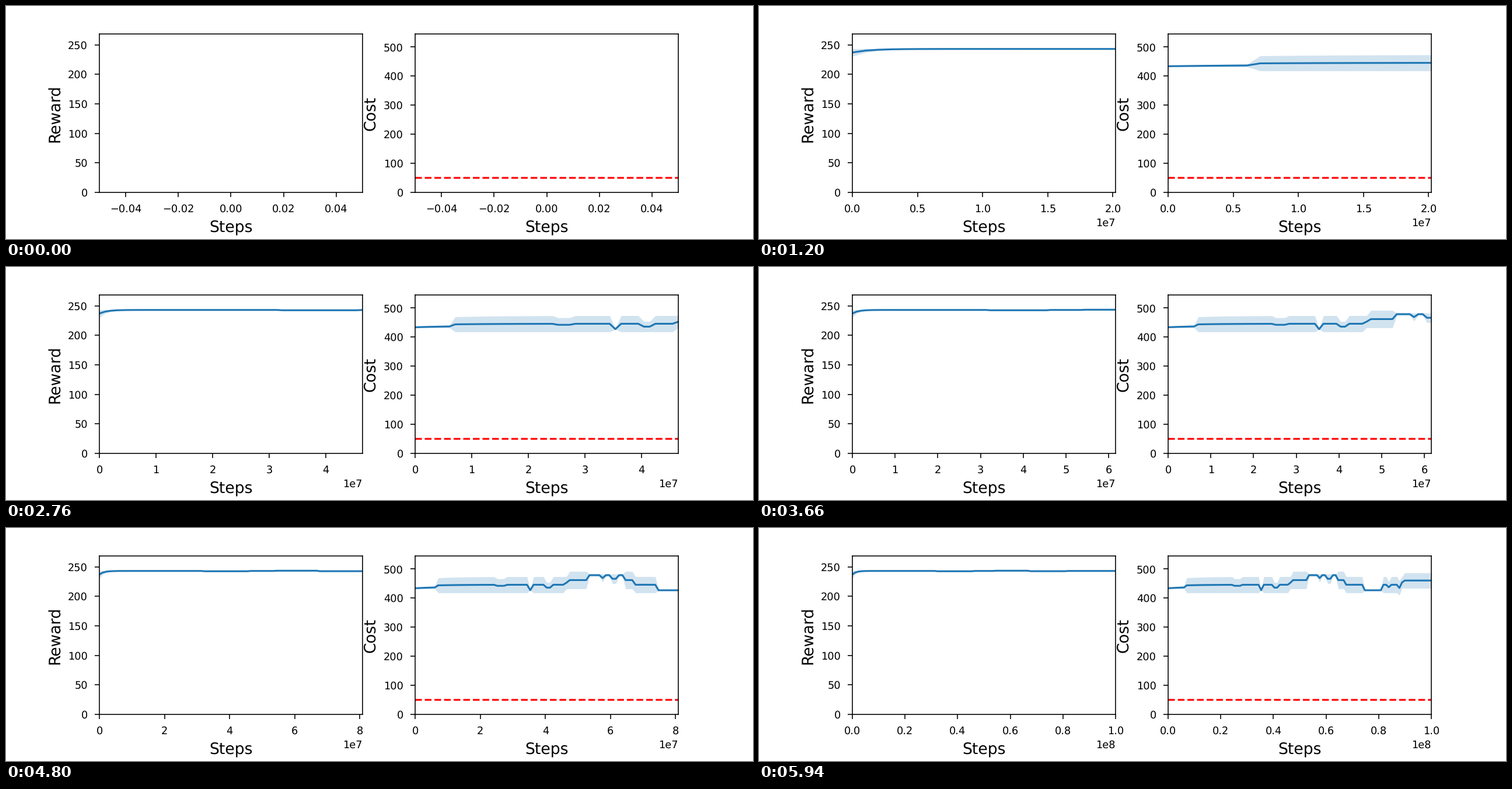
A matplotlib script that plays this animation: 1280x400 px, repeating every 6000 ms.

```python
import matplotlib.pyplot as plt
import numpy as np
from matplotlib.animation import FuncAnimation

FRAMES = 100
BLUE = "#1f77b4"

plt.rcParams.update({
    "font.family": "DejaVu Sans",
    "text.hinting": "none",
    "path.snap": False,
    "axes.labelsize": 12,
    "axes.linewidth": 0.72,
    "xtick.labelsize": 8,
    "ytick.labelsize": 8,
    "xtick.major.pad": 5.6,
    "ytick.major.pad": 5.6,
    "xtick.major.width": 0.72,
    "ytick.major.width": 0.72,
    "lines.linewidth": 1.4,
})

k = np.arange(FRAMES)
steps = k * 1e8 / (FRAMES - 1)


def plateau(first, last, height):
    """Raise samples first..last by height, with one-sample ramps."""
    return height * np.clip(np.minimum(k - first, last - k) + 1, 0, 1)


# Reward settles exponentially, then wanders slightly.
settle = 6 * np.exp(-k / 1.3)
reward = (243.1 - settle - plateau(32, 45, 0.5) + plateau(54, 66, 0.4)
          - plateau(67, 80, 0.4))
reward_dev = settle + 0.4

# Cost is the mean of two runs that hop between levels; the band spans them.
low = (418 + plateau(0, 6, 14) + plateau(35, 35, 8) + plateau(46, 66, 14)
       + plateau(53, 63, 43) - plateau(57, 57, 20) - plateau(60, 61, 25)
       + plateau(74, 80, 8) - plateau(87, 87, 8) + plateau(88, 99, 16))
high = (474 - 10 * np.exp(-k / 8) - plateau(0, 6, 28) - plateau(25, 27, 7)
        - plateau(35, 35, 45) - plateau(40, 41, 20) + plateau(47, 66, 18)
        - plateau(53, 63, 9) - plateau(74, 80, 46) - plateau(83, 83, 17)
        - plateau(87, 87, 14) + plateau(89, 99, 13))
cost, cost_dev = (high + low) / 2, (high - low) / 2

fig, (ax_reward, ax_cost) = plt.subplots(1, 2, figsize=(8, 2.5), dpi=160)
fig.subplots_adjust(left=0.125, right=0.9, bottom=0.2, top=0.88, wspace=0.2)


class Panel:
    def __init__(self, ax, mean, dev, label, top):
        self.ax, self.mean, self.dev = ax, mean, dev
        self.line, = ax.plot([], [], color=BLUE)
        self.band = None
        ax.set_ylim(0, top)
        ax.set_xlabel("Steps")
        ax.set_ylabel(label)

    def show(self, n):
        x, y, d = steps[:n + 1], self.mean[:n + 1], self.dev[:n + 1]
        if self.band:
            self.band.remove()
        self.band = self.ax.fill_between(x, y - d, y + d, color=BLUE,
                                         alpha=0.2, linewidth=0)
        self.line.set_data(x, y)
        self.ax.set_xlim((0, x[-1]) if n else (-0.05, 0.05))


panels = [
    Panel(ax_reward, reward, reward_dev, "Reward", 268.5),
    Panel(ax_cost, cost, cost_dev, "Cost", 545),
]
ax_cost.axhline(50, color="red", linestyle="--")


def update(n):
    for panel in panels:
        panel.show(n)


anim = FuncAnimation(fig, update, frames=FRAMES, init_func=lambda: update(0),
                     interval=60, repeat=True, blit=False)
plt.show()
```
